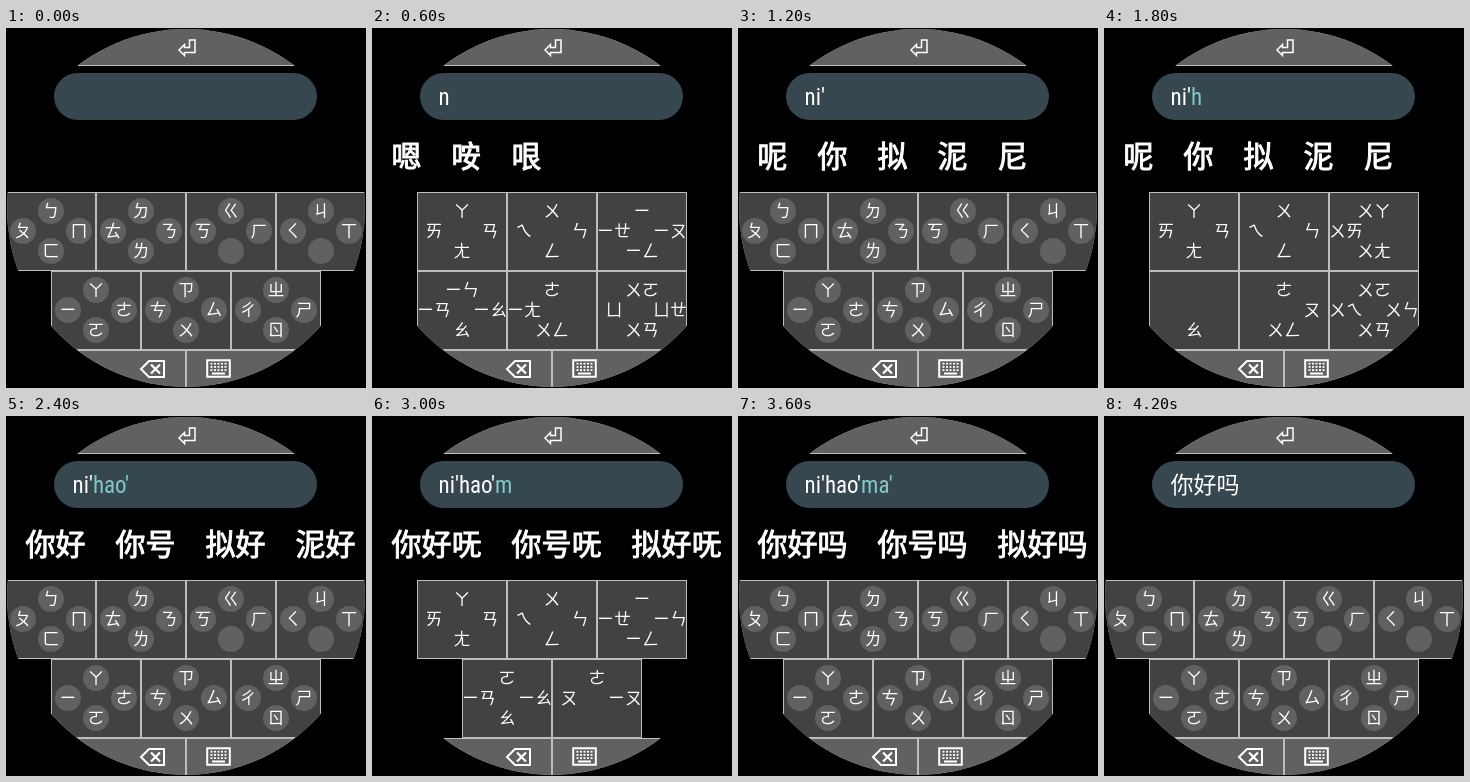
Recreate the animation shown at these times as an HTML page with a canvas. Size 360 px wide and 360 px high, loop 4800 ms.

```html
<!DOCTYPE html>
<html lang="zh-CN">
<head>
<meta charset="utf-8">
<style>
html, body { margin: 0; width: 100%; height: 100%; overflow: hidden; background: #000; }
canvas { display: block; }
</style>
</head>
<body>
<canvas width="360" height="360"></canvas>
<script>
const ctx = document.querySelector('canvas').getContext('2d');
const CJK = '"Noto Sans CJK SC", "Noto Sans CJK", sans-serif';
const BOPOMOFO = '"Noto Sans CJK TC", "Noto Sans CJK", sans-serif';
const BAR = '#616161', KEY = '#424242', LINE = '#bdbdbd', WHITE = '#fff', TEAL = '#80cbc4';
const STEP = 600;

// Rows of keys; each key lists its top, left, right and bottom symbols.
const keys = text => text.split('/').map(row => row.trim().split(' ').map(key => key.split(',')));
const initials = keys('ㄅ,ㄆ,ㄇ,ㄈ ㄉ,ㄊ,ㄋ,ㄌ ㄍ,ㄎ,ㄏ, ㄐ,ㄑ,ㄒ, / ㄚ,ㄧ,ㄜ,ㄛ ㄗ,ㄘ,ㄙ,ㄨ ㄓ,ㄔ,ㄕ,ㄖ');
const finals = rest => keys('ㄚ,ㄞ,ㄢ,ㄤ ㄨ,ㄟ,ㄣ,ㄥ ' + rest);
const finalsN = finals('ㄧ,ㄧㄝ,ㄧㄡ,ㄧㄥ / ㄧㄣ,ㄧㄢ,ㄧㄠ,ㄠ ㄜ,ㄧㄤ,,ㄨㄥ ㄨㄛ,ㄩ,ㄩㄝ,ㄨㄢ');
const finalsH = finals('ㄨㄚ,ㄨㄞ,,ㄨㄤ / ,,,ㄠ ㄜ,,ㄡ,ㄨㄥ ㄨㄛ,ㄨㄟ,ㄨㄣ,ㄨㄢ');
const finalsM = finals('ㄧ,ㄧㄝ,ㄧㄣ,ㄧㄥ / ㄛ,ㄧㄢ,ㄧㄠ,ㄠ ㄜ,ㄡ,ㄧㄡ,');

// Each state: settled text, text being typed, candidates, keyboard.
const states = [
  ['', '', '', initials],
  ['n', '', '嗯 咹 哏', finalsN],
  ["ni'", '', '呢 你 拟 泥 尼', initials],
  ["ni'", 'h', '呢 你 拟 泥 尼', finalsH],
  ["ni'", "hao'", '你好 你号 拟好 泥好', initials],
  ["ni'hao'", 'm', '你好呒 你号呒 拟好呒', finalsM],
  ["ni'hao'", "ma'", '你好吗 你号吗 拟好吗', initials],
  ['你好吗', '', '', initials],
];

function box(x, y, w, h, fill) {
  ctx.fillStyle = LINE;
  ctx.fillRect(x, y, w, h);
  ctx.fillStyle = fill;
  ctx.fillRect(x + 1, y + 1, w - 2, h - 2);
}

function stroke(path, width) {
  ctx.strokeStyle = WHITE;
  ctx.lineWidth = width;
  ctx.stroke(new Path2D(path));
}

function drawIcons() {
  stroke('M173 22L178.5 16.5V19.5H183.5V12H189V24.5H178.5V27.5Z', 1.5);
  stroke('M135 341L143 333H158V349H143Z', 2);
  stroke('M145 336.5L154 345.5M154 336.5L145 345.5', 2.2);
  stroke('M201.2 332.2H223.8V348.8H201.2Z', 2);
  stroke('M206 345.5H219', 1.8);
  ctx.fillStyle = WHITE;
  for (let row = 0; row < 3; row++)
    for (let col = 0; col < 5; col++)
      ctx.fillRect(204.5 + col * 3.5, 334.8 + row * 3.2, 2, 1.8);
}

function drawKey(symbols, x, y, round) {
  box(x, y, 90, 79, KEY);
  const cx = x + 45, cy = y + 39;
  const spots = [[cx, cy - 20], [cx - 28, cy], [cx + 28, cy], [cx, cy + 20]];
  symbols.forEach((symbol, i) => {
    const [sx, sy] = spots[i];
    if (round) {
      ctx.fillStyle = BAR;
      ctx.beginPath();
      ctx.arc(sx, sy, 13, 0, 7);
      ctx.fill();
    }
    ctx.fillStyle = WHITE;
    ctx.fillText(symbol, sx, sy + 6);
  });
}

function drawField(settled, typing) {
  ctx.fillStyle = '#37474f';
  ctx.beginPath();
  ctx.roundRect(48, 45, 263, 47, 23.5);
  ctx.fill();
  ctx.textAlign = 'left';
  ctx.font = '400 condensed 23px "Roboto Condensed", Roboto, ' + CJK;
  if (settled > '~') ctx.font = '400 23px ' + CJK;
  ctx.fillStyle = WHITE;
  ctx.fillText(settled, 66.5, 77);
  ctx.fillStyle = TEAL;
  ctx.fillText(typing, 66.5 + ctx.measureText(settled).width, 77);
}

// Candidates are emboldened by outlining the regular weight.
function drawCandidates(words) {
  ctx.font = '400 30px ' + CJK;
  ctx.fillStyle = ctx.strokeStyle = WHITE;
  ctx.lineWidth = 1;
  let x = 19.5;
  for (const word of words) {
    ctx.fillText(word, x, 139);
    ctx.strokeText(word, x, 139);
    x += word.length * 30 + 30;
  }
}

function draw([settled, typing, candidates, rows]) {
  ctx.fillStyle = '#000';
  ctx.fillRect(0, 0, 360, 360);

  ctx.save();
  ctx.beginPath();
  ctx.arc(180, 180, 179, 0, 7);
  ctx.clip();
  box(0, -1, 360, 39, BAR);
  box(0, 322, 180, 40, BAR);
  box(180, 322, 180, 40, BAR);
  ctx.font = '400 17px ' + BOPOMOFO;
  ctx.textAlign = 'center';
  rows.forEach((row, r) => row.forEach((symbols, i) =>
    drawKey(symbols, 180 - row.length * 45 + i * 90, 164 + r * 79, rows === initials)));
  drawIcons();
  ctx.restore();

  drawField(settled, typing);
  drawCandidates(candidates.split(' '));
}

function tick() {
  draw(states[Math.floor(performance.now() / STEP) % states.length]);
  requestAnimationFrame(tick);
}
tick();
</script>
</body>
</html>
```
